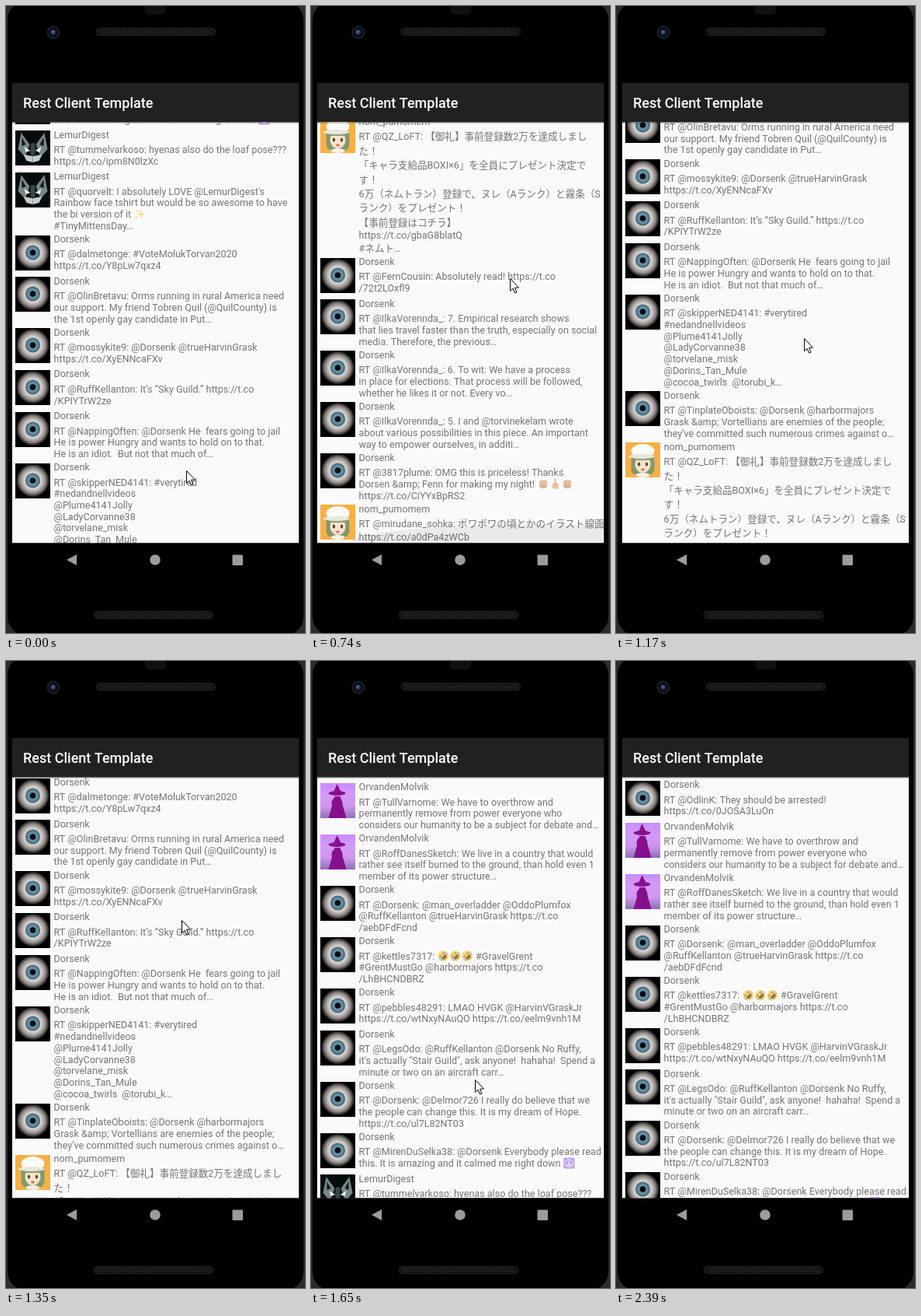
An HTML page with a canvas for the animation above (2940 ms loop, 385 by 806 pixels).

```html
<!DOCTYPE html>
<html lang="en">
<head>
<meta charset="utf-8">
<title>Rest Client Template</title>
<style>
html, body { margin: 0; width: 100%; height: 100%; overflow: hidden; background: #000; }
canvas { display: block; width: 385px; height: 806px; }
</style>
</head>
<body>
<canvas id="stage" width="385" height="806"></canvas>
<script>
const ctx = document.getElementById('stage').getContext('2d');
const LOOP = 2940, END = 2390;
const VIEW = { x: 8, y: 149.3, w: 369, h: 541.3 };
const TEXT_FONT = '12.57px Roboto, "Noto Sans CJK JP", "Noto Sans CJK", sans-serif';
const AVATAR = 45, EMOJI = 15.5;
const LATIN_PITCH = 14.7, CJK_PITCH = 18.4;

const posts = [];
const add = (avatar, author) => text => posts.push({ avatar, author, lines: text.split('\n') });
const eyePost = add(drawEye, 'Dorsenk');
const hatPost = add(drawHat, 'OrvandenMolvik');
const beastPost = add(drawBeast, 'LemurDigest');
const capPost = add(drawCap, 'nom_pumomem');

eyePost('RT @OdlinK: They should be arrested!\nhttps://t.co/0JOSA3LuOn');
hatPost('RT @TullVarnome: We have to overthrow and\npermanently remove from power everyone who\nconsiders our humanity to be a subject for debate and…');
hatPost('RT @RoffDanesSketch: We live in a country that would\nrather see itself burned to the ground, than hold even 1\nmember of its power structure…');
eyePost('RT @Dorsenk: @man_overladder @OddoPlumfox\n@RuffKellanton @trueHarvinGrask https://t.co\n/aebDFdFcnd');
eyePost('RT @kettles7317: 🤣🤣🤣 #GravelGrent\n#GrentMustGo @harbormajors https://t.co\n/LhBHCNDBRZ');
eyePost('RT @pebbles48291: LMAO HVGK @HarvinVGraskJr\nhttps://t.co/wtNxyNAuQO https://t.co/eelm9vnh1M');
eyePost('RT @LegsOdo: @RuffKellanton @Dorsenk No Ruffy,\nit\'s actually "Stair Guild", ask anyone!  hahaha!  Spend a\nminute or two on an aircraft carr…');
eyePost('RT @Dorsenk: @Delmor726 I really do believe that we\nthe people can change this. It is my dream of Hope.\nhttps://t.co/ul7L82NT03');
eyePost('RT @MirenDuSelka38: @Dorsenk Everybody please read\nthis. It is amazing and it calmed me right down ☮');
beastPost('RT @tummelvarkoso: hyenas also do the loaf pose???\nhttps://t.co/ipm8N0lzXc');
beastPost('RT @quorvelt: I absolutely LOVE @LemurDigest\'s\nRainbow face tshirt but would be so awesome to have\nthe bi version of it ✨\n#TinyMittensDay…');
eyePost('RT @dalmetonge: #VoteMolukTorvan2020\nhttps://t.co/Y8pLw7qxz4');
eyePost('RT @OlinBretavu: Orms running in rural America need\nour support. My friend Tobren Quil (@QuilCounty) is\nthe 1st openly gay candidate in Put…');
eyePost('RT @mossykite9: @Dorsenk @trueHarvinGrask\nhttps://t.co/XyENNcaFXv');
eyePost('RT @RuffKellanton: It’s “Sky Guild.” https://t.co\n/KPIYTrW2ze');
eyePost('RT @NappingOften: @Dorsenk He  fears going to jail\nHe is power Hungry and wants to hold on to that.\nHe is an idiot.  But not that much of…');
eyePost('RT @skipperNED4141: #verytired\n#nedandnellvideos\n@Plume4141Jolly\n@LadyCorvanne38\n@torvelane_misk\n@Dorins_Tan_Mule\n@cocoa_twirls  @torubi_k…');
eyePost('RT @TinplateOboists: @Dorsenk @harbormajors\nGrask &amp; Vortellians are enemies of the people;\nthey\'ve committed such numerous crimes against o…');
capPost('RT @QZ_LoFT: 【御礼】事前登録数2万を達成しまし\nた！\n「キャラ支給品BOXI×6」を全員にプレゼント決定で\nす！\n6万（ネムトラン）登録で、ヌレ（Aランク）と霧条（S\nランク）をプレゼント！\n【事前登録はコチラ】\nhttps://t.co/gbaG8blatQ\n#ネムト…');
eyePost('RT @FernCousin: Absolutely read! https://t.co\n/72t2LOxfl9');
eyePost('RT @IlkaVorennda_: 7. Empirical research shows\nthat lies travel faster than the truth, especially on social\nmedia. Therefore, the previous…');
eyePost('RT @IlkaVorennda_: 6. To wit: We have a process\nin place for elections. That process will be followed,\nwhether he likes it or not. Every vo…');
eyePost('RT @IlkaVorennda_: 5. I and @torvinekelam wrote\nabout various possibilities in this piece. An important\nway to empower ourselves, in additi…');
eyePost('RT @3817plume: OMG this is priceless! Thanks\nDorsen &amp; Fenn for making my night! ✊☝✊\nhttps://t.co/CiYYxBpRS2');
capPost('RT @mirudane_sohka: ポワポワの頃とかのイラスト線画\nhttps://t.co/a0dPa4zWCb');

// Lines holding CJK text are taller; a row is never lower than its avatar.
const pitch = line => /[\u3000-\u9fff\uff00-\uffef]/.test(line) ? CJK_PITCH : LATIN_PITCH;
let nextTop = 0;
for (const post of posts) {
  let offset = 0;
  post.offsets = post.lines.map((line, i, all) =>
    offset += i ? (pitch(all[i - 1]) + pitch(line)) / 2 : 0);
  post.top = nextTop;
  post.height = Math.max(53.7, 36.6 + offset);
  nextTop += post.height;
}

const clamp = u => Math.min(1, Math.max(0, u));
const progress = (t, start, end) => clamp((t - start) / (end - start));
const easeOut = (u, power) => 1 - (1 - u) ** power;
const smooth = u => u * u * (3 - 2 * u);
const bump = (t, start, end) => Math.sin(Math.PI * progress(t, start, end));

// Three swipes: down to the end, part of the way up, then to the top.
function scrollAt(t) {
  return 549
    + 636.6 * easeOut(progress(t, 0, 620), 1.47)
    - 495.6 * easeOut(progress(t, 840, 1420), 2.19)
    - 690 * easeOut(progress(t, 1420, 1700), 1.5);
}

function cursorAt(t) {
  const pos = { x: 232, y: 597 };
  const move = (start, end, dx, dy) => {
    const u = smooth(progress(t, start, end));
    pos.x += dx * u;
    pos.y += dy * u;
  };
  move(0, 300, 24, -247);
  move(840, 1000, 1, 165);
  move(1000, 1350, -31, -182);
  move(1370, 1640, -15, 205);
  move(1690, END, 181, 214);
  return pos;
}

function rect(color, x, y, w, h, r = 0) {
  ctx.fillStyle = color;
  ctx.beginPath();
  ctx.roundRect(x, y, w, h, r);
  ctx.fill();
}
function oval(color, x, y, rx, ry = rx) {
  ctx.fillStyle = color;
  ctx.beginPath();
  ctx.ellipse(x, y, rx, ry, 0, 0, Math.PI * 2);
  ctx.fill();
}
function poly(color, ...xy) {
  ctx.fillStyle = color;
  ctx.beginPath();
  for (let i = 0; i < xy.length; i += 2) ctx.lineTo(xy[i], xy[i + 1]);
  ctx.closePath();
  ctx.fill();
}
function shade(gradient, ...colors) {
  colors.forEach((c, i) => gradient.addColorStop(i / (colors.length - 1), c));
  return gradient;
}
const fade = (y0, y1, ...colors) => shade(ctx.createLinearGradient(0, y0, 0, y1), ...colors);
const glow = (x, y, r, ...colors) => shade(ctx.createRadialGradient(x, y, 0, x, y, r), ...colors);

function at(x, y, draw) {
  ctx.save();
  ctx.translate(x, y);
  draw();
  ctx.restore();
}
// Runs a drawing twice around the current origin, the second time mirrored.
function mirrored(draw) {
  draw();
  ctx.scale(-1, 1);
  draw();
}

// Avatars have their origin at the middle of the top edge.
const backdrop = color => rect(color, -AVATAR / 2, 0, AVATAR, AVATAR);

function drawEye() {
  backdrop('#000');
  oval(glow(0, 22, 21, '#efebe8', '#efebe8', '#e4e0dd', '#c4bfbc', '#85807e', '#111'), 0, 22, 21);
  oval(glow(0, 22, 10, '#6b95aa', '#6b95aa', '#5f8a9f', '#33505e'), 0, 22, 9.5);
  oval('#0a0d10', 0, 22, 3.8);
}
function drawHat() {
  backdrop(fade(0, AVATAR, '#c78cff', '#d59af8', '#cf95ee', '#8a72b4'));
  const plum = '#86108c';
  poly(plum, -12, AVATAR, -4, 17, 3, 17, 11, AVATAR);
  oval(plum, -1, 26, 7, 8);
  poly(plum, -6, 13, -1, 1, 5, 13);
  oval(plum, -1, 13, 11, 3);
}
function drawBeast() {
  backdrop('#060a0a');
  mirrored(() => {
    poly('#77878a', 4, 18, 15, 3, 19, 24, 10, 34);
    poly('#101617', 9, 18, 14, 9, 14, 20);
    poly('#e8eded', 3, 26, 11, 21, 9, 28);
    poly('#c4cccc', 0, 33, 12, 31, 8, 39, 0, 41);
  });
  rect('#39474a', -3, 16, 6, 16, 3);
}
function drawCap() {
  backdrop('#f8b045');
  rect('#83996b', -15, 14, 30, 28, 8);
  oval('#f4f0e8', 0, AVATAR - 3, 9, 3);
  oval('#fbe2cb', 0, 28, 10, 11);
  rect('#8ba670', -11, 15, 22, 8, 3);
  oval('#fbfaf7', 0, 11, 15, 9);
  oval('#eae5df', -2, 18, 17, 3);
  mirrored(() => oval('#564535', 5, 28, 1.7, 2.6));
  oval('#c96a58', 0, 35, 2.3, 1.4);
}

// Emoji have their origin at their centre.
function drawLaugh() {
  oval('#fbc437', 0, 0, 6.8);
  ctx.rotate(-0.8);
  rect('#6d4527', -4, 0, 8, 4.5, [0, 0, 4, 4]);
  mirrored(() => {
    rect('#6d4527', 1.3, -3, 3, 1.2);
    oval('#8fcdf2', 5.4, 1, 1.4, 2.2);
  });
}
function drawPeace() {
  rect('#9a6cf0', -7, -7, 14, 14, 2);
  ctx.strokeStyle = '#fff';
  ctx.lineWidth = 1.4;
  ctx.beginPath();
  ctx.arc(0, 0, 4.9, 0, Math.PI * 2);
  for (const turn of [-2, 1, 2, 3]) {
    const angle = turn * Math.PI / 4;
    ctx.moveTo(0, 0);
    ctx.lineTo(4.9 * Math.cos(angle), 4.9 * Math.sin(angle));
  }
  ctx.stroke();
}
function drawStar(r) {
  ctx.fillStyle = '#f9cf50';
  ctx.beginPath();
  for (let i = 0; i < 8; i++) {
    const d = i % 2 ? r * 0.35 : r, angle = i * Math.PI / 4;
    ctx.lineTo(d * Math.cos(angle), d * Math.sin(angle));
  }
  ctx.fill();
}
function drawSparkle() {
  at(1.5, 0, () => drawStar(5.5));
  at(-4, -4, () => drawStar(2.6));
  at(-4, 4, () => drawStar(2.4));
}
function drawFist() {
  rect('#e0b48c', -5.5, -5, 11, 10, 3);
  rect('#d3a37b', -4, 1, 8, 5, 2);
  for (let i = -1; i < 2; i++) rect('#b58660', i * 2.7 - 0.3, -4, 0.7, 5);
}
function drawFinger() {
  rect('#e0b48c', -1.5, -7, 3, 9, 1.5);
  rect('#d9ab82', -4, -1, 8.5, 7.5, 2.5);
}
const emoji = { '🤣': drawLaugh, '☮': drawPeace, '✨': drawSparkle, '✊': drawFist, '☝': drawFinger };

function drawLine(text, x, y) {
  for (const part of text.split(/([🤣☮✨✊☝])/u)) {
    if (emoji[part]) {
      ctx.globalAlpha = 0.65;
      at(x + EMOJI / 2, y - 4.5, emoji[part]);
      ctx.globalAlpha = 1;
      x += EMOJI;
    } else {
      ctx.fillStyle = '#757575';
      ctx.fillText(part, x, y);
      x += ctx.measureText(part).width;
    }
  }
}

function drawPost(post, y) {
  at(12 + AVATAR / 2, Math.round(y + 4.5), post.avatar);
  drawLine(post.author, 61.6, y + 13.8);
  post.lines.forEach((line, i) => drawLine(line, 61.6, y + 33.2 + post.offsets[i]));
}

function drawList(t) {
  const { x, y, w, h } = VIEW;
  const scroll = scrollAt(t);
  const edgeGlow = (amount, edge, middle) =>
    oval(`rgba(33,33,33,${0.07 * amount})`, middle, edge, 230, 24 * amount);
  ctx.save();
  ctx.beginPath();
  ctx.rect(x, y, w, h);
  ctx.clip();
  rect('#fafafa', x, y, w, h);
  ctx.font = TEXT_FONT;
  for (const post of posts) {
    const top = y + post.top - scroll;
    if (top < y + h && top + post.height > y) drawPost(post, top);
  }
  edgeGlow(bump(t, 560, 920), y + h, 280);
  edgeGlow(bump(t, 1690, 2250), y, 205);
  rect(fade(y, y + 2.5, 'rgba(0,0,0,.35)', 'rgba(0,0,0,0)'), x, y, w, 3);
  ctx.restore();
}

function drawSpeaker(x, y) {
  rect('#262626', x, y, 154, 10, 5);
  rect('#141414', x + 1, y + 1, 152, 8, 4);
  for (let i = 0; i < 96; i++) rect('#2c2c2c', x + 5 + i * 1.5, y + 3 + i % 2 * 2.6, 1.4, 1.4);
}

function drawPhone() {
  rect('#2b2b2b', 0, 0, 385, 806);
  rect('#000', 2, -6, 381, 815, 24);
  rect('#101010', 179, -6, 27, 17, 5);
  oval('#1f1f23', 61, 34, 8.5);
  oval('#0d0e14', 61, 34, 6.5);
  oval(glow(60, 33, 4, '#5a68b0', '#1c2452'), 61, 34, 3.2);
  drawSpeaker(116, 28);
  drawSpeaker(113, 778);

  rect('#212121', VIEW.x, 99, VIEW.w, VIEW.y - 99);
  ctx.fillStyle = '#fff';
  ctx.font = '500 18px Roboto, sans-serif';
  ctx.fillText('Rest Client Template', 22, 131.3);

  const gray = '#9c9c9c';
  poly(gray, 78, 712, 91, 705, 91, 719);
  oval(gray, 192, 712, 6.8);
  rect(gray, 291.5, 705.5, 13.5, 13.5, 1);
}

function drawCursor() {
  poly('#fff', 0.5, 0.5, 0.5, 16.5, 4, 13.2, 6.6, 19, 9, 18, 6.5, 12.2, 11.5, 12);
  ctx.strokeStyle = '#000';
  ctx.lineWidth = 1;
  ctx.stroke();
}

function frame(now) {
  const t = Math.min(now % LOOP, END);
  const cursor = cursorAt(t);
  drawPhone();
  drawList(t);
  if (t < END) at(cursor.x, cursor.y, drawCursor);
  requestAnimationFrame(frame);
}
requestAnimationFrame(frame);
</script>
</body>
</html>
```
